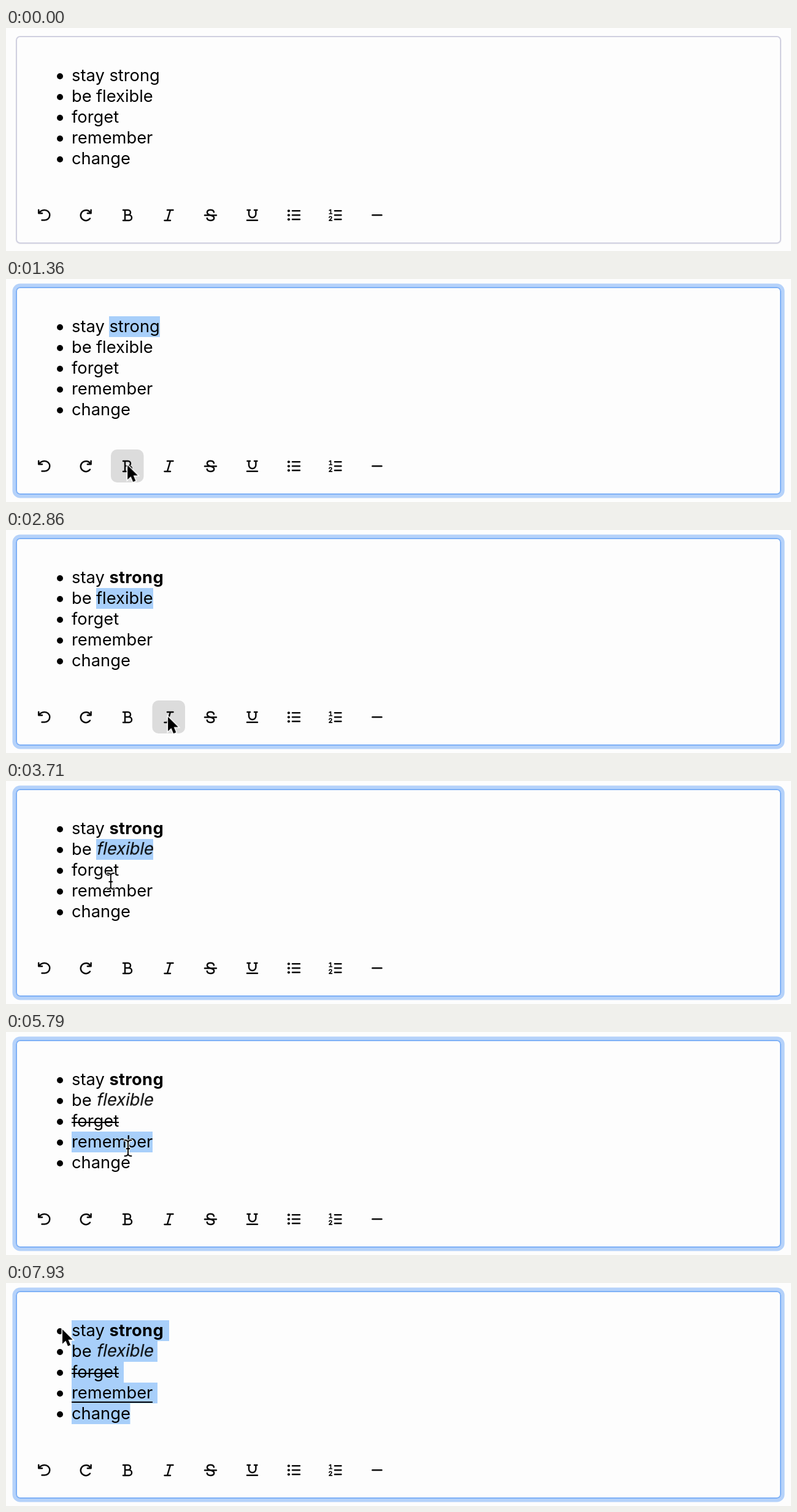
Recreate the animation shown at these times as an HTML page. Size 1280x365 px, loop 8 s.

```html
<!DOCTYPE html>
<html lang="en">
<head>
<meta charset="utf-8">
<title>Rich text editor</title>
<style>
  html, body { margin: 0; width: 100%; height: 100%; overflow: hidden; background: #fdfdfd; }
  .stage { position: relative; width: 1280px; height: 365px; overflow: hidden; color: #000; }
  .stage * { box-sizing: border-box; }

  /* every timeline lasts 8s; state changes are hard steps */
  .box, .word, .word::after, .slant, .caret, .hover rect, .arrow, .beam {
    animation: 8s step-end infinite;
  }

  .box {
    position: absolute; left: 16px; top: 12.5px; width: 1248px; height: 340px;
    border: 2px solid #d0d0e0; border-radius: 7px;
    box-shadow: 0 1px 2px #0000000d;
    animation-name: focus;
  }
  @keyframes focus {
    9.75%, 100% { border-color: #7fb1f6; box-shadow: 0 0 0 5.5px #b5d2fa; }
  }

  ul {
    position: absolute; left: 107px; top: 61px; margin: 0; padding: 0; list-style: none;
    font: 27.3px/34px Inter, "Noto Sans", sans-serif;
  }
  li { position: relative; height: 34px; white-space: pre; }
  li::before {
    content: ""; position: absolute; left: -24.5px; top: 13px;
    width: 10px; height: 10px; border-radius: 50%; background: #000;
  }
  .word { position: relative; display: inline-block; height: 34px; vertical-align: top; }
  .word::after { position: absolute; left: 0; right: 0; height: 2.2px; background: #000; opacity: 0; }
  .slant { display: inline-block; transform-origin: 0 24px; animation-name: slant; }

  .strong { animation-name: pick1, bold; }
  .flexible { animation-name: pick2; }
  .forget { animation-name: pick3; }
  .remember { animation-name: pick4; }
  .forget::after { content: ""; top: 17.5px; animation-name: strike; }
  .remember::after { content: ""; top: 30.5px; animation-name: under; }

  @keyframes pick1 { 10.8% { background: #a8cffa; } 27.5%, 100% { background: #a8cffa00; } }
  @keyframes pick2 { 28.4% { background: #a8cffa; } 49%, 100% { background: #a8cffa00; } }
  @keyframes pick3 { 49.9% { background: #a8cffa; } 70.9%, 100% { background: #a8cffa00; } }
  @keyframes pick4 { 71.7% { background: #a8cffa; } 92.3%, 100% { background: #a8cffa00; } }
  @keyframes bold {
    0% { font-weight: 400; letter-spacing: 0; }
    19.5%, 100% { font-weight: 700; letter-spacing: 0.3px; }
  }
  @keyframes slant { 0% { transform: none; } 39%, 100% { transform: skewX(-11deg); } }
  @keyframes strike { 62%, 100% { opacity: 1; } }
  @keyframes under { 81.5%, 100% { opacity: 1; } }

  .caret { position: absolute; width: 1.5px; height: 32px; background: #000; opacity: 0; }
  .c1 { left: 201.5px; top: 62px; animation-name: caret1; }
  .c2 { left: 190px; top: 96px; animation-name: caret2; }
  .c3 { left: 147px; top: 130px; animation-name: caret3; }
  .c4 { left: 199px; top: 164px; animation-name: caret4; }
  @keyframes caret1 { 9.75% { opacity: 1; } 10.8%, 100% { opacity: 0; } }
  @keyframes caret2 { 27.5% { opacity: 1; } 28.4%, 100% { opacity: 0; } }
  @keyframes caret3 { 49% { opacity: 1; } 49.9%, 100% { opacity: 0; } }
  @keyframes caret4 { 70.9% { opacity: 1; } 71.7%, 100% { opacity: 0; } }

  /* drag selection, growing upwards from the end of the last line */
  .drag i {
    position: absolute; height: 34px; left: 107px; background: #a8cffa;
    animation: 8s steps(2) infinite;
  }
  .drag i:nth-child(1) { top: 61px; width: 159px; animation-name: row1; }
  .drag i:nth-child(2) { top: 95px; width: 140px; animation-name: row2; }
  .drag i:nth-child(3) { top: 129px; width: 85px; animation-name: row3; }
  .drag i:nth-child(4) { top: 163px; width: 140px; animation-name: row4; }
  .drag i:nth-child(5) { top: 197px; width: 95.5px; animation-name: row5; }
  @keyframes row1 {
    0%, 98.22% { clip-path: inset(0 0 0 100%); }
    98.23%, 100% { clip-path: inset(0); }
  }
  @keyframes row2 {
    0%, 96.66% { clip-path: inset(0 0 0 100%); }
    96.67% { clip-path: inset(0 0 0 27px); }
    98.22%, 100% { clip-path: inset(0); }
  }
  @keyframes row3 {
    0%, 95.05% { clip-path: inset(0 0 0 100%); }
    95.06% { clip-path: inset(0 0 0 55px); }
    96.66% { clip-path: inset(0 0 0 27px); }
    96.67%, 100% { clip-path: inset(0); }
  }
  @keyframes row4 {
    0%, 93.44% { clip-path: inset(0 0 0 100%); }
    93.45% { clip-path: inset(0 0 0 83px); }
    95.05% { clip-path: inset(0 0 0 55px); }
    95.06%, 100% { clip-path: inset(0); }
  }
  @keyframes row5 {
    0%, 92.5% { clip-path: inset(0 0 0 95.5px); }
    93.44% { clip-path: inset(0 0 0 80px); }
    93.45%, 100% { clip-path: inset(0); }
  }

  svg { position: absolute; left: 0; top: 0; }
  .icons { fill: none; stroke: #0b0b0b; stroke-width: 2.5; stroke-linecap: round; stroke-linejoin: round; }
  .icons .solid { fill: #0b0b0b; stroke: none; }
  .icons .digit { stroke-width: 1.7; }

  .hover rect { fill: #dcdcdc; opacity: 0; }
  .hover rect:nth-child(1) { animation-name: hoverB; }
  .hover rect:nth-child(2) { animation-name: hoverI; }
  .hover rect:nth-child(3) { animation-name: hoverS; }
  .hover rect:nth-child(4) { animation-name: hoverU; }
  @keyframes hoverB { 16.5% { opacity: 1; } 24.8%, 100% { opacity: 0; } }
  @keyframes hoverI { 35.2% { opacity: 1; } 43.8%, 100% { opacity: 0; } }
  @keyframes hoverS { 58% { opacity: 1; } 66%, 100% { opacity: 0; } }
  @keyframes hoverU { 78.5% { opacity: 1; } 85%, 100% { opacity: 0; } }

  .pointer { animation: move 8s ease-in-out infinite; }
  @keyframes move {
    0%, 2.5% { transform: translate(330px, 400px); animation-timing-function: ease-out; }
    8.25%, 11.75% { transform: translate(209px, 76px); }
    17.5% { transform: translate(198px, 308px); }
    21.5% { transform: translate(198px, 308px); animation-timing-function: ease-in; }
    24.125% { transform: translate(198px, 148px); animation-timing-function: ease-out; }
    26.5%, 30% { transform: translate(190px, 114px); }
    36.25% { transform: translate(265px, 308px); }
    42% { transform: translate(265px, 308px); animation-timing-function: ease-in; }
    46.375% { transform: translate(171px, 164px); animation-timing-function: ease-out; }
    48.5%, 52.5% { transform: translate(150px, 148px); }
    59%, 64% { transform: translate(333px, 308px); }
    70.5%, 73.5% { transform: translate(199px, 190px); }
    79.5% { transform: translate(401px, 308px); }
    83.5% { transform: translate(401px, 308px); animation-timing-function: ease-in; }
    87.5% { transform: translate(258px, 252px); animation-timing-function: ease-out; }
    91% { transform: translate(206px, 216px); }
    92.5% { transform: translate(206px, 216px); animation-timing-function: linear; }
    99.125%, 100% { transform: translate(92px, 76px); }
  }
  .arrow { animation-name: arrow; }
  .beam { animation-name: beam; fill: none; stroke-linecap: round; }
  @keyframes arrow {
    0%, 16.2%, 35%, 57.5%, 78%, 98.6%, 100% { opacity: 1; }
    4.5%, 22.8%, 43.4%, 65.4%, 86.5% { opacity: 0; }
  }
  @keyframes beam {
    0%, 16.2%, 35%, 57.5%, 78%, 98.6%, 100% { opacity: 0; }
    4.5%, 22.8%, 43.4%, 65.4%, 86.5% { opacity: 1; }
  }
</style>
</head>
<body>
<div class="stage">
  <div class="box"></div>
  <div class="drag"><i></i><i></i><i></i><i></i><i></i></div>
  <ul>
    <li>stay <span class="word strong">strong</span></li>
    <li>be <span class="word flexible"><span class="slant">flexible</span></span></li>
    <li><span class="word forget">forget</span></li>
    <li><span class="word remember">remember</span></li>
    <li>change</li>
  </ul>
  <div class="caret c1"></div>
  <div class="caret c2"></div>
  <div class="caret c3"></div>
  <div class="caret c4"></div>

  <svg width="1280" height="365" viewBox="0 0 1280 365">
    <defs>
      <path id="ibeam" d="M-5.5 -13C-2 -13 0 -12 0 -9V9C0 12 -2 13 -5.5 13M5.5 -13C2 -13 0 -12 0 -9M5.5 13C2 13 0 12 0 9M-2.5 1H2.5"/>
    </defs>
    <g class="hover">
      <rect x="171" y="279" width="53.5" height="54" rx="10"/>
      <rect x="238.5" y="279" width="53.5" height="54" rx="10"/>
      <rect x="306.5" y="279" width="53.5" height="54" rx="10"/>
      <rect x="374.5" y="279" width="53.5" height="54" rx="10"/>
    </g>
    <g class="icons">
      <!-- undo, redo -->
      <path d="M53.2 297.8V303.2H59M54 302.4C57 298.7 60 298 63 298A8.2 8.2 0 0 1 63 314.6H58.5"/>
      <path d="M138.6 297.8V303.2H132.8M137.6 302.4A8.5 8.5 0 1 0 137 311.8"/>
      <!-- bold, italic -->
      <path d="M191 298H199A4 4 0 0 1 199 306H194M194 298V315M191 315H200.5A4.5 4.5 0 0 0 200.5 306"/>
      <path d="M263 298H272.5M258.5 315H268M268 298L263 315"/>
      <!-- strikethrough, underline -->
      <path d="M324 306.5H343M339 301.5C338.5 296.8 328.5 296.5 328 301.5C328 304 330 305.5 333.5 306.5C338 307.6 339.5 309 339.3 311.3C338.5 316.3 328.2 316 327.8 311.2"/>
      <path d="M393.5 298H398M405 298H409.5M396 298V304.5A5.7 5.7 0 0 0 407.4 304.5V298M393 314.8H410"/>
      <!-- lists -->
      <path d="M467 299.3H479M467 306.3H479M467 313.3H479M536 299.3H546.5M536 306.3H546.5M536 313.3H546.5"/>
      <g class="solid">
        <circle cx="461" cy="299.3" r="2.1"/>
        <circle cx="461" cy="306.3" r="2.1"/>
        <circle cx="461" cy="313.3" r="2.1"/>
      </g>
      <path class="digit" d="M527.3 298.5L529.5 297.4V304M527.3 304H531.5M527 310.2C527.4 307.8 531.3 308 531 310.5C530.8 312 528.5 313.3 527 315.2H531.5"/>
      <!-- divider -->
      <path d="M597.5 306.3H612.5"/>
    </g>
    <g class="pointer">
      <path class="arrow" d="M0 0V23.5L5.4 18.4L9 27.3L13.2 25.6L9.5 16.8H16.7Z"
        stroke="#fff" stroke-width="3" paint-order="stroke"/>
      <g class="beam">
        <use href="#ibeam" stroke="#fff" stroke-width="4.2"/>
        <use href="#ibeam" stroke="#000" stroke-width="1.9"/>
      </g>
    </g>
  </svg>
</div>
</body>
</html>
```
